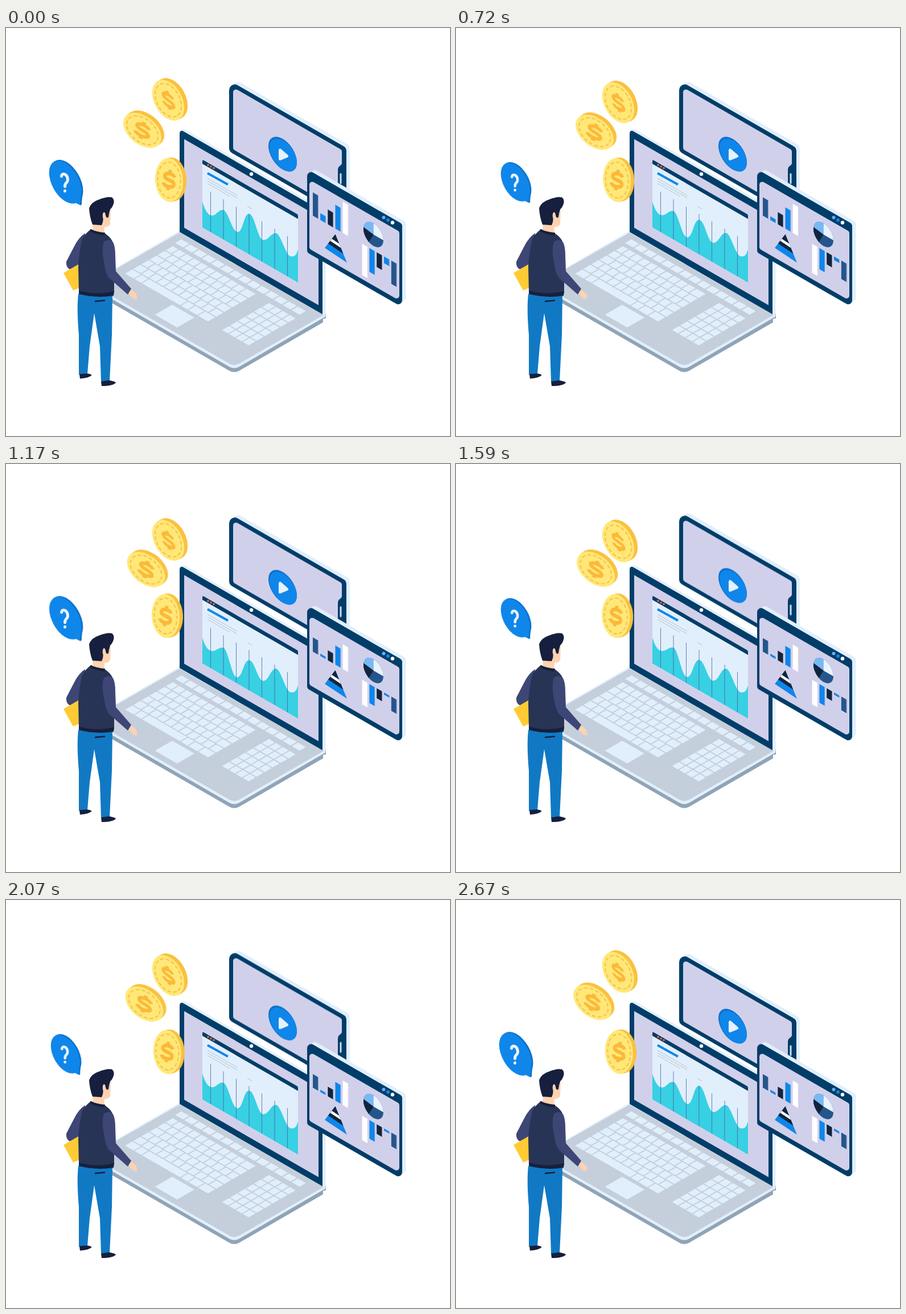
Recreate the animation shown at these times as an HTML page. Size 780 by 718 pixels, loop 2700 ms.

```html
<!DOCTYPE html>
<html lang="en">
<head>
<meta charset="utf-8">
<title>Online analytics</title>
<style>
  html, body { margin: 0; width: 100%; height: 100%; overflow: hidden; background: #fff; }
  svg { display: block; width: 780px; height: 718px; }

  .dark { fill: #003d68; stroke: #003d68; }
  .rim { fill: #e1effc; stroke: #e1effc; }
  .screen { fill: #d1d0eb; stroke: #d1d0eb; }
  .flat { stroke: none; }
  .slab { stroke-linejoin: round; }
  .navy { fill: #24568c; }
  .blue { fill: #0f86ea; }
  .ink { fill: #11253d; }
  .white { fill: #fff; }
  .skin { fill: #ffd3b0; }
  .hair { fill: #161f3d; }
  .sleeve { fill: #3e4676; }

  .move { animation: 2700ms linear infinite; }
  #coinTop { animation-name: drop; }
  #coinLeft { animation-name: drift; }
  #coinMid { animation-name: slide; }
  #tablet { animation-name: lift; animation-timing-function: ease-in-out; }
  #bubble { animation-name: pulse; animation-timing-function: ease-in-out; transform-origin: 105px 271px; }
  #wave { animation-name: wave; animation-timing-function: ease-in-out; }
  .bar { animation-timing-function: ease-in-out; animation-name: shrink; transform-box: fill-box; transform-origin: 50% 100%; }
  .bar.hang { transform-origin: 50% 0; }
  .bar.early { animation-name: shrinkEarly; }
  .bar.late { animation-name: shrinkLate; }

  @keyframes drop { 60% { transform: translateY(10px); } }
  @keyframes drift { 50% { transform: translate(7.5px, 6.5px); } }
  @keyframes slide { 50% { transform: translateX(-7px); } }
  @keyframes lift {
    0%, 27% { transform: none; }
    56%, 62% { transform: translateY(-8.3px); }
    100% { transform: none; }
  }
  @keyframes pulse {
    0%, 40%, 100% { transform: none; }
    14%, 26%, 56.7%, 83.3% { transform: scale(.9); }
  }
  @keyframes shrink { 0% { transform: none; } 53%, 100% { transform: scaleY(var(--k)); } }
  @keyframes shrinkEarly { 0%, 6% { transform: none; } 40%, 100% { transform: scaleY(var(--k)); } }
  @keyframes shrinkLate { 0%, 14% { transform: none; } 47%, 100% { transform: scaleY(var(--k)); } }
  @keyframes wave {
    0%, 100% { d: path("M345 306C349 318 354 330 362 330S372 320 381 320S397 359 407 359S417 327 427 327S442 373 452 373S465 361 474 361S491 402 501 402S510 396 513 390V448L345 351Z"); }
    50% { d: path("M345 306C349 318 354 329 362 329S372 323 381 323S396 376 406 376S417 346 427 346S442 382 452 382S465 360 474 360S491 402 501 402S510 396 513 390V448L345 351Z"); }
  }
</style>
</head>
<body>
<svg viewBox="0 0 780 718">
  <defs>
    <g id="dollar" fill="none" stroke="#fbb93a" stroke-width="6.300">
      <path d="M9.500 -6C7 -12.500 -9 -12 -9 -5.500C-9 2 10 -2 10 6C10 12.500 -8 13 -10 6"/>
      <path d="M0 -17V-10M0 10V17"/>
    </g>
  </defs>

  <g id="tablet" class="move">
    <g id="tabletFrame"></g>
    <path class="dark flat" d="M591 235Q590 241 586 243Q583 245 583 250V278Q583 284 587 285L592 292Z"/>
    <path d="M588 257V273" stroke="#c9dcf3" stroke-width="3" stroke-linecap="round"/>
    <g transform="matrix(1 .577 0 1 486 222)">
      <ellipse fill="#0b6fcb" rx="25" ry="27"/>
      <ellipse class="blue" cx="1" cy="1" rx="24" ry="25.500"/>
    </g>
    <path d="M481.500 215V230.500L493.500 225.500Z" fill="#e6f1fd" stroke="#e6f1fd" stroke-width="5" stroke-linejoin="round"/>
  </g>

  <g id="laptop">
    <path fill="#90a4b7" d="M148 462L392 603Q401 608 410 603L557 518V512L562 511V502L400 560L148 446Z"/>
    <path class="rim flat" d="M148 455L392 596Q401 601 410 596L561 508V498L305 357L148 448Z"/>
    <path fill="#c5cfdb" d="M148 450L305 360L558 505L409 591Q401 595 393 591Z"/>
    <g id="keys" fill="#e1effc"></g>
    <g transform="matrix(1 .577 0 1 305 178)">
      <path class="rim flat" transform="translate(5.500 -5)" d="M-2 181V8Q-2 0 5 0H251V185Z"/>
      <path class="dark flat" d="M0 181V9Q0 0 7 0H251V181Z"/>
      <path class="screen flat" d="M8 13H244V169H8Z"/>
    </g>
    <circle class="white" cx="431" cy="257" r="3.200"/>
    <g transform="matrix(1 .577 0 1 345 231.500)">
      <rect class="rim flat" y="2" width="168" height="117.500"/>
      <path class="dark flat" d="M0 7.500V3Q0 0 3 0H166Q168 0 168 2V7.500Z"/>
    </g>
    <g fill="#e9663f">
      <circle cx="355" cy="241" r="1.900"/><circle cx="360" cy="243.800" r="1.900"/><circle cx="365" cy="246.600" r="1.900"/>
    </g>
    <path d="M354 255.500L390 275.500" stroke="#0f86ea" stroke-width="4"/>
    <path d="M354 264.500L406 294.500M354 269L406 299M354 273.500L393 296M424 314L432 318.500" stroke="#b8c0cb" stroke-width="1"/>
    <path id="wave" class="move" fill="#38d0e3"/>
    <g id="ticks" stroke="#4660a5" stroke-width=".8"></g>
  </g>

  <g id="panel">
    <g id="panelFrame"></g>
    <g id="bars" transform="matrix(1 .577 0 1 529 251)"></g>
    <circle cx="663.500" cy="333.500" r="3" fill="#67aff4"/>
    <circle class="blue" cx="671" cy="338" r="3"/>
    <circle class="white" cx="679" cy="342.500" r="3.200"/>
    <g transform="matrix(1 .577 0 1 645.500 363.500)">
      <ellipse class="navy" rx="17.500" ry="20"/>
      <path fill="#78b8f5" d="M0 0L-17.300 -3A17.500 20 0 0 1 0 -20Z"/>
      <path fill="#e9f3fd" d="M0 0V-20A17.500 20 0 0 1 17.500 0Z"/>
      <path class="ink" d="M0 0L-17.300 -3A17.500 20 0 0 0 -8 17.800Z"/>
    </g>
    <path class="blue" d="M578.500 363L560 387L599 413Z"/>
    <path class="ink" d="M578.500 363L565.900 379.300L592.400 397Z"/>
    <path class="white" d="M572.400 371L569.600 374.500L588.300 387L585.300 379.500Z"/>
  </g>

  <g id="coinTop" class="move"></g>
  <g id="coinLeft" class="move"></g>
  <g id="coinMid" class="move"></g>

  <g id="man">
    <path class="sleeve" d="M139 361Q128 368 120 384L106 411Q105 420 111 424L120 427L133 411L138 380Z"/>
    <path fill="#ffcb35" d="M101 431L127 416L131 456L118 462Z"/>
    <path class="skin" d="M214 465L220 460L228 467Q232 474 229 478L223 476Z"/>
    <path fill="#1179c4" d="M127 468H187L186 540L182 622H167L165 560L155 502L147 560L143 609L128 610L128 540Q124 495 127 468Z"/>
    <path d="M157 481L173 479.500" stroke="#161f3d" stroke-width="2.500" stroke-linecap="round"/>
    <path class="hair" d="M129 609L142 608Q150 609 150.500 611Q146 616 130 617ZM167 622L181 620Q192 622 193 624Q188 630 168 630Z"/>
    <path class="skin" d="M153 342L152 356L172 362L173 350Q181 350 183 345L184 318L172 315L160 330Z"/>
    <path class="hair" d="M146 317Q150 306 163 302Q178 296 186 298Q191 302 189 309Q187 316 183 319Q181 325 180 333Q176 336 175 329Q174 324 172 324Q169 326 170 333Q172 339 168 347L152 346Q147 333 146 317Z"/>
    <path fill="#273455" d="M148 355L173 361Q188 370 190 386V466Q160 474 128 465L127 420Q129 390 134 371Q140 361 148 355Z"/>
    <path class="hair" d="M149 353.500Q158 360 174 360L173 365Q155 363 147 357ZM128 462Q158 471 190 463L189 471Q158 476 128 468Z"/>
    <path class="sleeve" d="M172 376Q181 370 188 377Q192 384 192 400L193 428L220 459L214 469L181 440Q175 432 173 417Q167 390 172 376Z"/>
  </g>

  <g id="bubble" class="move">
    <path fill="#0b6fcb" d="M117 305L131 312Q134 311 133 307L135 285Z"/>
    <g transform="matrix(1 .577 0 1 105 271)">
      <ellipse fill="#0b6fcb" cx="1.500" cy="-1.500" rx="29" ry="34.500"/>
      <ellipse class="blue" cx="-.8" cy=".5" rx="28.500" ry="34"/>
    </g>
    <path class="blue" d="M114 304L130 311L132 290Z"/>
    <path d="M97.500 261C98 253.500 108 257 108.500 266.500C109 273 103 271.500 103.500 279M103.500 286.500V287" fill="none" stroke="#eef6ff" stroke-width="5" stroke-linecap="round"/>
  </g>
</svg>
<script>
  const byId = id => document.getElementById(id);
  const add = (id, markup) => byId(id).insertAdjacentHTML('beforeend', markup);

  // Upright isometric plate with round corners; x, y is its sharp top-left corner
  function slab(id, cls, x, y, w, h, r) {
    const point = (dx, dy) => `${x + dx},${y + dx * .577 + dy}`;
    const inset = r * 1.155;
    const points = [point(r, inset), point(w - r, inset), point(w - r, h - inset), point(r, h - inset)];
    add(id, `<polygon class="slab ${cls}" points="${points.join(' ')}" stroke-width="${2 * r}"/>`);
  }
  slab('tabletFrame', 'rim', 398, 88, 206, 124, 10);
  slab('tabletFrame', 'dark', 392, 92, 206, 125, 10);
  slab('tabletFrame', 'screen', 399, 104.5, 191, 109, 5);
  slab('panelFrame', 'rim', 535.5, 245, 167, 145, 7);
  slab('panelFrame', 'dark', 529, 248.5, 167, 146.500, 7);
  slab('panelFrame', 'screen', 533, 267, 158, 121.500, 5);

  // Keyboard blocks lie on the isometric floor
  const block = (x, y, rects) => add('keys',
    `<g transform="matrix(.866 .5 -.866 .5 ${x} ${y})">${rects.join('')}</g>`);
  const key = (x, y, w, h) => `<rect x="${x}" y="${y}" width="${w}" height="${h}"/>`;
  const grid = (cols, rows, dx, dy, gap) => Array.from({ length: cols * rows }, (_, i) =>
    key(i % cols * dx, Math.floor(i / cols) * dy, dx - gap, dy - gap));

  block(308, 372, grid(14, 1, 18.2, 15, 2.5));
  const main = [];
  for (let row = 0; row < 5; row++) {
    const first = 13 + row * 3 % 8;
    main.push(key(0, row * 16.4, first - 2.2, 14.2));
    let x = first;
    for (; x < 148; x += 15.2) main.push(key(x, row * 16.4, 13, 14.2));
    main.push(key(x, row * 16.4, 168 - x, 14.2));
  }
  [[0, 17], [19, 13], [34, 77], [113, 13], [128, 18], [148, 20]]
    .forEach(([x, w]) => main.push(key(x, 82, w, 14.5)));
  block(293, 384, main);
  block(462, 484, grid(4, 6, 14, 16.2, 2.2));
  block(292, 487, [key(0, 0, 45, 35)]);

  for (let i = 0; i < 7; i++) {
    const x = 359.5 + i * 22.5;
    add('ticks', `<path d="M${x} ${288.5 + i * 12.95}V${359 + i * 12.98}"/>`);
  }

  // Bars: fill, start height, end height, timing
  const bars = [
    ['navy', 41, 24, ''], ['blue', 12, 4, 'early'], ['ink', 26, 17, ''],
    ['blue', 42, 33, ''], ['white', 55, 43, 'late']
  ];
  const bar = (x, y, [fill, from, to], cls) => add('bars',
    `<rect class="move bar ${fill} ${cls}" x="${x}" y="${y}" width="9.3" height="${from}" style="--k:${to / from}"/>`);
  bars.forEach((b, i) => bar(10 + i * 13.15, 73.5 - b[1], b, b[3]));
  [...bars].reverse().forEach((b, i) => bar(96.6 + i * 12.8, 73, b, 'hang ' + b[3]));

  function coin(id, x, y, angle, dx, dy, skew) {
    const oval = (k, attrs, part = 0) =>
      `<ellipse rx="${38.5 * k}" ry="${24.5 * k}" transform="translate(${x + dx * part} ${y + dy * part}) rotate(${angle})" ${attrs}/>`;
    add(id, [1, .75, .5, .25].map(p => oval(1, 'fill="#fbc03f"', p)).join('') +
      oval(1, 'fill="#ffe878"') +
      oval(.82, 'fill="none" stroke="#f8c24a" stroke-width="2.2" stroke-dasharray="6.5 3.8"') +
      `<use href="#dollar" transform="matrix(${skew} ${x} ${y})"/>`);
  }
  coin('coinTop', 285, 127, 62, 6, -3, '.9 .45 .12 .98');
  coin('coinLeft', 239.5, 180, 39.5, 5, -4, '1.1 .5 -.2 .85');
  coin('coinMid', 286.5, 267.5, 86, 6, -1, '.92 .2 -.13 1.05');
</script>
</body>
</html>
```
